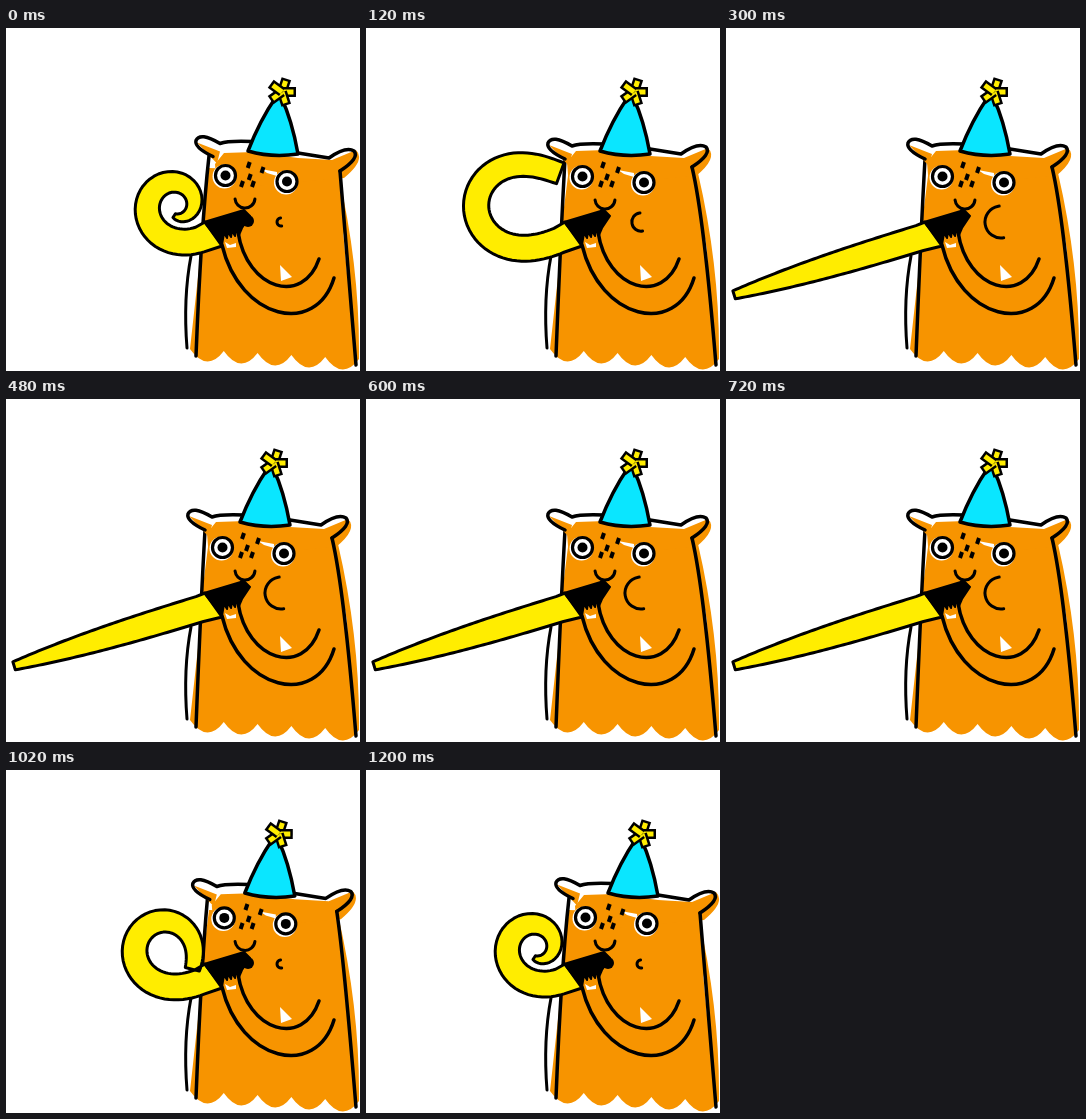
Recreate the animation shown at these times as an HTML page with a canvas. Size 354 px wide and 343 px high, loop 1380 ms.

```html
<!DOCTYPE html>
<html lang="en">
<head>
<meta charset="utf-8">
<title>Party blower</title>
<style>
html, body { margin: 0; width: 100%; height: 100%; overflow: hidden; background: #fff; }
canvas { display: block; width: 354px; height: 343px; }
</style>
</head>
<body>
<canvas id="stage" width="354" height="343"></canvas>
<script>
const ctx = document.getElementById('stage').getContext('2d');
const LOOP = 1380, STEP = 30, SEGMENTS = 60;
const ORANGE = '#f79400', YELLOW = '#ffed00', CYAN = '#0ae6ff', INK = '#000', WHITE = '#fff';

// The blower unrolls through these poses. Its heading is
// aim + turn * (1 - (1 - s^a)^b) degrees; pinch tightens the tip.
const poses = [
  { aim: 153, turn: 425, a: 1.4, b: 1, len: 215, tip: 2, pinch: .6 },
  { aim: 155, turn: 225, a: 1.9, b: 2, len: 231, tip: 11, pinch: 0 },
  { aim: 155, turn: 160, a: 2, b: 1, len: 196, tip: 6, pinch: 0 },
  { aim: 163, turn: 0, a: 2, b: 1, len: 208, tip: 4, pinch: 0 }
];

const lerp = (a, b, k) => a + (b - a) * k;
const ramp = (t, from, to) => Math.max(0, Math.min(1, (t - from) / (to - from)));

function poseAt(phase) {
  const i = Math.min(Math.floor(phase), poses.length - 2), mixed = {};
  for (const key in poses[i]) mixed[key] = lerp(poses[i][key], poses[i + 1][key], phase - i);
  return mixed;
}

function paint(path, fill, stroke, width = 3.5) {
  if (typeof path === 'string') path = new Path2D(path);
  if (fill) { ctx.fillStyle = fill; ctx.fill(path); }
  if (stroke) { ctx.strokeStyle = stroke; ctx.lineWidth = width; ctx.stroke(path); }
}
const line = (path, width) => paint(path, null, INK, width);

function arc(x, y, r, from = 0, to = 2 * Math.PI) {
  const path = new Path2D();
  path.arc(x, y, r, from, to);
  return path;
}

function shifted(dx, dy, drawPart) {
  ctx.save();
  ctx.translate(dx, dy);
  drawPart();
  ctx.restore();
}

function drawBody(rest) {
  let fur = 'M203 140L196 195L193 240L184 321', x = 184, y = 321;
  for (let i = 0; i < 5; i++, x += 33.8, y += 2) {
    fur += `Q${x + 17} ${y + 24} ${x + 33.8} ${y + 2}`;
  }
  paint(fur + 'Q354 240 332 145Z', ORANGE);
  shifted(8 * rest, 2 * rest, () =>
    paint('M201 134L210 123L240 122L284 128L318 130L342 120Q352 130 330 148L203 160Z', ORANGE));

  paint('M274 237L286 249L275 253Z', WHITE);
  paint('M337 203Q343 222 341 245Z', WHITE);
  paint('M219 214L224 217L230 215V219L221 220Z', WHITE);

  line('M185 228Q177 270 181 320', 3);
  line(`M${199 + 4 * rest} ${131 - 3 * rest}Q195 200 190 328`);
  line(`M${326 + 8 * rest} ${139 + 4 * rest}Q338 190 350 337`);
  shifted(8 * rest, -2.5 * rest, () => {
    paint('M183 117L206 126L203 138Z', ORANGE);
    line('M199 131Q180 122 182 115Q186 106 206 118Q214 115 238 116');
  });
  shifted(8 * rest, 4 * rest, () => line('M284 121L315 126Q332 114 340 119Q346 126 326 139'));
}

function drawFace(rest, puff) {
  shifted(3 * rest, -rest, () => {
    line('M252 143L265 147', 0.1);
    paint('M252 142L268 145V149L258 146Z', WHITE);
    for (const [x, y] of [[216.5, 148.5], [278, 154.5]]) {
      paint(arc(x - 1, y + 1, 12), WHITE);
      paint(arc(x, y, 10), WHITE, INK, 3.2);
      paint(arc(x, y, 5), INK);
    }
  });
  ctx.lineCap = 'butt';
  for (const [x, y] of [[237, 137], [252, 142], [241, 149], [235, 156], [246, 156]]) {
    const fx = x + rest * (160 - y) / 4;
    line(`M${fx + 1} ${y - 3}L${fx - 1} ${y + 3}`, 4);
  }
  ctx.lineCap = 'round';
  line(arc(239, 171 - rest, 10, .1, Math.PI - .1), 3);
  line(arc(275, 194, lerp(4, 16, puff), 1.4, 4.6), 3);
}

function drawHat() {
  paint('M234 123Q246 92 262 69L267 69Q278 92 284 126Q258 130 234 123Z', CYAN, INK);
  ctx.lineCap = 'butt';
  for (let i = 0; i < 5; i++) {
    const angle = -1.25 + i * Math.PI * 2 / 5;
    const ray = r => `M268 64l${r * Math.cos(angle)} ${r * Math.sin(angle)}`;
    line(ray(14), 10);
    paint(ray(11.5), null, YELLOW, 5);
  }
  ctx.lineCap = 'round';
}

function drawBlower({ aim, turn, a, b, len, tip, pinch }) {
  const inner = ['199 194'], outer = ['216 218'];
  let x = 207, y = 206;
  for (let i = 0; i < SEGMENTS; i++) {
    const s = (i + .5) / SEGMENTS;
    const angle = (aim + turn * (1 - (1 - s ** a) ** b)) * Math.PI / 180;
    const step = len / SEGMENTS * (1 - pinch * s ** 4);
    x += step * Math.cos(angle);
    y += step * Math.sin(angle);
    if (i < 3) continue;
    const half = lerp(13, tip, s ** 2.7);
    const nx = -half * Math.sin(angle), ny = half * Math.cos(angle);
    inner.push(`${x + nx} ${y + ny}`);
    outer.push(`${x - nx} ${y - ny}`);
  }
  paint(`M${[...inner, ...outer.reverse()].join('L')}Z`, YELLOW, INK, 3);
}

function drawHands(rest) {
  let mouthpiece = 'M198 194L238 182L244 188L236 200';
  for (let i = 0; i < 4; i++) mouthpiece += `L${233 - 4 * i} ${207 + i}L${230 - 4 * i} ${202 + i}`;
  paint(mouthpiece + 'L216 217Z', INK, INK, 2);
  paint(arc(242, 193, 6 * Math.min(1, rest * 2)), INK);
  line('M216 217C234 292 310 309 328 250');
  line('M232 204C241 262 297 278 313 231');
}

function draw(now) {
  const t = Math.floor(now % LOOP / STEP) * STEP;
  const phase = 3 * (ramp(t, 30, 300) - ramp(t, 765, 1080));
  const rest = 1 - ramp(t, 30, 120) + ramp(t, 750, 1200);
  const puff = ramp(t, 30, 240) - ramp(t, 750, 960);
  ctx.fillStyle = WHITE;
  ctx.fillRect(0, 0, 354, 343);
  ctx.lineCap = ctx.lineJoin = 'round';
  drawBody(rest);
  drawFace(rest, puff);
  shifted(8 * rest, 0, drawHat);
  drawBlower(poseAt(phase));
  drawHands(rest);
}

const start = performance.now();
function tick() {
  draw(performance.now() - start);
  requestAnimationFrame(tick);
}
tick();
</script>
</body>
</html>
```
